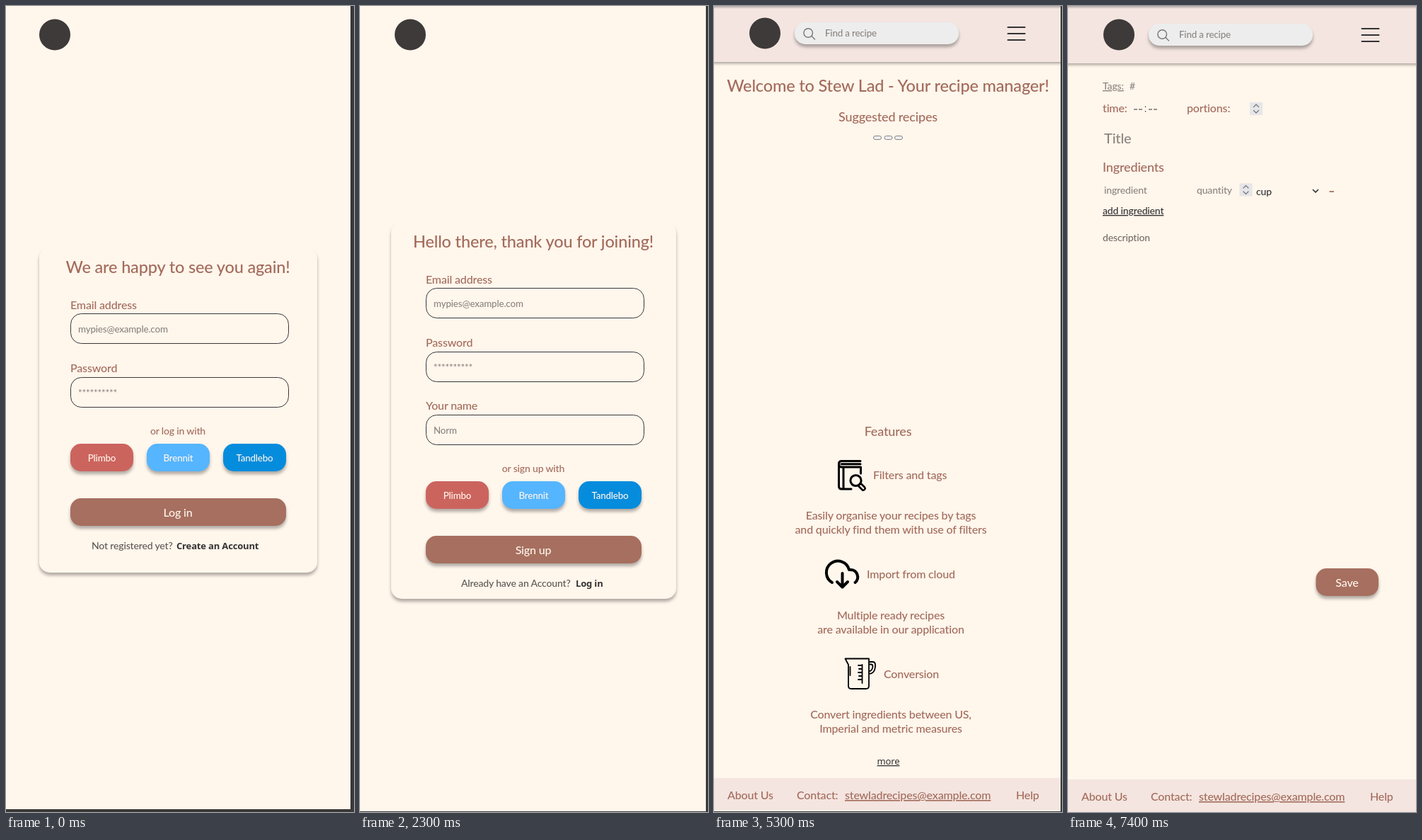
Animation of 492x1138 px, one loop 8 s. Source, as an HTML page:

```html
<!DOCTYPE html>
<html lang="en">
<head>
<meta charset="utf-8">
<title>Recipe manager</title>
<style>
  html, body { margin: 0; width: 100%; height: 100%; overflow: hidden; background: #3a3838; }
  #stage { display: block; width: 492px; height: 1138px; font: 500 16px Lato, sans-serif; letter-spacing: -.01em; fill: #a36b5b; }

  .screen { visibility: hidden; animation: 8s step-end infinite; }
  #login { animation-name: login; }
  #signup { animation-name: signup; }
  #home { animation-name: home; }
  #recipe { animation-name: recipe; }
  @keyframes login { 0% { visibility: visible } 6.25%, 100% { visibility: hidden } }
  @keyframes signup { 0% { visibility: hidden } 6.25% { visibility: visible } 43.75%, 100% { visibility: hidden } }
  @keyframes home { 0% { visibility: hidden } 43.75% { visibility: visible } 81.25%, 100% { visibility: hidden } }
  @keyframes recipe { 0% { visibility: hidden } 81.25%, 100% { visibility: visible } }

  .page, .card { fill: #fff6ec; }
  .card, .btn, .bar, .search { filter: drop-shadow(0 4px 2px rgba(0, 0, 0, .3)); }
  .btn { fill: #a66f5f; }
  .bar, .foot { fill: #f4e5e0; }
  .bar { filter: drop-shadow(0 2px 2px rgba(0, 0, 0, .36)); }
  .search { fill: #ededed; }
  .box { fill: none; stroke: #3a3838; }
  .logo { fill: #3d3a39; }
  .line { fill: none; stroke: #333; stroke-width: 1.7; stroke-linecap: round; stroke-linejoin: round; }
  .icon { fill: none; stroke: #000; stroke-linecap: round; stroke-linejoin: round; }
  .pill { fill: #efefef; stroke: #858585; }

  .mid { text-anchor: middle; }
  .h1 { font-size: 23.5px; }
  .h2 { font-size: 18px; }
  .small { font-size: 14px; }
  .hint { font-size: 13.33px; fill: #8b8580; }
  .gray { fill: #8b8580; }
  .dark { fill: #333; }
  .note { font-size: 14px; fill: #5c5855; }
  .bold { font: bold 13px "Noto Sans", sans-serif; fill: #333; }
  .white { fill: #fff6ec; }
  .under { text-decoration: underline; }
</style>
</head>
<body>
<svg id="stage" viewBox="0 0 492 1138">
  <defs>
    <linearGradient id="edge" x2="0" y2="1">
      <stop stop-color="#000" stop-opacity=".28"/>
      <stop offset="1" stop-color="#000" stop-opacity="0"/>
    </linearGradient>

    <rect id="field" class="box" x="91.5" y="434.5" width="308" height="42" rx="15"/>
    <rect id="shade" width="492" height="4" fill="url(#edge)"/>

    <g id="credentials">
      <text x="91" y="428">Email address</text>
      <use href="#field"/>
      <text class="hint" x="102" y="461">mypies@example.com</text>
      <text x="91" y="517">Password</text>
      <use href="#field" y="90"/>
      <text class="hint" x="102" y="551">**********</text>
    </g>

    <g id="buttons">
      <rect class="btn" x="91" y="618" width="89" height="39" rx="15" style="fill:#cc645e"/>
      <rect class="btn" x="199" y="618" width="89" height="39" rx="15" style="fill:#55b5ff"/>
      <rect class="btn" x="307" y="618" width="89" height="39" rx="15" style="fill:#058cdd"/>
      <g class="mid white" font-size="13.33">
        <text x="135.5" y="643">Plimbo</text>
        <text x="243.5" y="643">Brennit</text>
        <text x="351.5" y="643">Tandlebo</text>
      </g>
      <rect class="btn" x="91" y="695" width="305" height="39" rx="15"/>
    </g>

    <g id="header">
      <rect class="bar" x="-4" y="-6" width="500" height="85"/>
      <circle class="logo" cx="72" cy="38.5" r="22"/>
      <rect class="search" x="114" y="23" width="232" height="31" rx="15"/>
      <path class="line" style="stroke:#777;stroke-width:1.4" d="M139.5 38a6.3 6.3 0 1 1-12.6 0a6.3 6.3 0 1 1 12.6 0M138 42.5L142.5 47"/>
      <text class="hint" x="157" y="43">Find a recipe</text>
      <path class="line" style="stroke-width:2" d="M415.5 30h24m-24 9h24m-24 9h24"/>
    </g>

    <g id="footer">
      <rect class="foot" y="1090" width="492" height="46"/>
      <text x="19" y="1120">About Us</text>
      <text x="117" y="1120">Contact:</text>
      <text class="under" x="185" y="1120">stewladrecipes@example.com</text>
      <text x="427" y="1120">Help</text>
    </g>

    <g id="spinner">
      <rect width="18" height="18" fill="#e6e6e9"/>
      <path class="line" style="stroke:#777;stroke-width:1.2" d="M5.5 6.5L9 3l3.5 3.5M5.5 11.5L9 15l3.5-3.5"/>
    </g>
  </defs>

  <svg id="login" class="screen" width="487" height="1134">
    <rect class="page" width="492" height="1138"/>
    <circle class="logo" cx="69" cy="40.5" r="22"/>
    <rect class="card" x="47" y="341" width="393" height="459" rx="15"/>
    <text class="h1 mid" x="243" y="377">We are happy to see you again!</text>
    <use href="#credentials"/>
    <text class="small mid" x="243" y="605">or log in with</text>
    <use href="#buttons"/>
    <text class="mid white" x="243" y="720.5">Log in</text>
    <text class="note" x="121" y="766.5">Not registered yet?</text>
    <text class="bold" x="241" y="766.5">Create an Account</text>
  </svg>

  <svg id="signup" class="screen" width="489" height="1137">
    <rect class="page" width="492" height="1138"/>
    <circle class="logo" cx="71" cy="40.5" r="22"/>
    <rect class="card" x="44" y="305" width="403" height="532" rx="15"/>
    <text class="h1 mid" x="245" y="340.5">Hello there, thank you for joining!</text>
    <use href="#credentials" x="2" y="-36"/>
    <text x="93" y="570">Your name</text>
    <use href="#field" x="2" y="143"/>
    <text class="hint" x="104" y="604">Norm</text>
    <text class="small mid" x="245" y="658">or sign up with</text>
    <use href="#buttons" x="2" y="53"/>
    <text class="mid white" x="245" y="773.5">Sign up</text>
    <text class="note" x="143" y="819.5">Already have an Account?</text>
    <text class="bold" x="305" y="819.5">Log in</text>
  </svg>

  <svg id="home" class="screen" width="490" height="1137">
    <rect class="page" width="492" height="1138"/>
    <use href="#header"/>
    <use href="#shade"/>
    <text class="h1 mid" x="246" y="121">Welcome to Stew Lad - Your recipe manager!</text>
    <text class="h2 mid" x="246" y="163">Suggested recipes</text>
    <rect class="pill" x="225.5" y="183.5" width="11" height="5" rx="2.5"/>
    <rect class="pill" x="241" y="183.5" width="11" height="5" rx="2.5"/>
    <rect class="pill" x="255.5" y="183.5" width="11" height="5" rx="2.5"/>

    <text class="h2 mid" x="246" y="607">Features</text>
    <g class="icon" stroke-width="3">
      <path d="M207 642.5H180.500q-4 0-4 4V678q0 4 4 4H194M176.500 647q0 4 4 4H207.500V660M180 646.800H207M183 651.500V681.500"/>
      <circle cx="200.5" cy="670" r="7.6"/>
      <path d="M205 676l3-1.500 5 5q1.500 2-.5 3.500t-3 0l-5-5z" stroke-width="2.5"/>
    </g>
    <text x="225" y="667.5">Filters and tags</text>
    <g class="mid">
      <text x="250" y="725">Easily organise your recipes by tags</text>
      <text x="250" y="745">and quickly find them with use of filters</text>
      <text x="250" y="865.5">Multiple ready recipes</text>
      <text x="250" y="885.5">are available in our application</text>
      <text x="250" y="1006">Convert ingredients between US,</text>
      <text x="250" y="1026">Imperial and metric measures</text>
    </g>
    <path class="icon" stroke-width="4" d="M167 814A16.300 16.300 0 1 1 191 796H193A10.200 10.200 0 0 1 199.500 814M181.500 801V820M174 813L181.500 820.500L189 813"/>
    <text x="216" y="808">Import from cloud</text>
    <path class="icon" stroke-width="1.8" d="M185.500 921.500H219V960q0 4-4 4H194q-4 0-4-4V930zM219 926h5q4 0 4 4v3q-1 10-9 10M219 929.500h3q2.500 0 2.500 3q-.5 6-5.500 7M192.500 933V945M209.500 930V956M209 931h-5m5 5h-4m4 5h-5m5 5h-4m4 5h-5"/>
    <text x="240" y="948.5">Conversion</text>
    <text class="mid dark under" x="246.5" y="1071" style="font:13px 'Noto Sans',sans-serif">more</text>
    <use href="#footer"/>
    <rect class="page" y="1135" width="492" height="3"/>
  </svg>

  <svg id="recipe" class="screen" width="492" height="1138">
    <rect class="page" width="492" height="1138"/>
    <use href="#header" y="2"/>
    <use href="#shade"/>
    <text class="small gray under" x="49" y="118">Tags:</text>
    <text class="small gray" x="87" y="118">#</text>
    <text x="49" y="150">time:</text>
    <path class="line" style="stroke-width:1.2;stroke-linecap:butt" d="M93 146h5m2 0h5m9 0h5m2 0h5M109.500 141.500v1.500m0 5v1.500"/>
    <text x="168" y="150">portions:</text>
    <use href="#spinner" x="257" y="136"/>
    <text class="gray" x="51" y="194" font-size="20">Title</text>
    <text class="h2" x="49" y="234">Ingredients</text>
    <text class="small gray" x="51" y="265">ingredient</text>
    <text class="small gray" x="182" y="265">quantity</text>
    <use href="#spinner" x="242.5" y="250.5"/>
    <text class="small dark" x="266" y="267">cup</text>
    <path class="line" d="M346.500 259.500l3.500 3.500 3.500-3.500"/>
    <path class="line" style="stroke:#a36b5b;stroke-linecap:butt" d="M369.500 262h6.500"/>
    <text class="small dark under" x="49" y="294">add ingredient</text>
    <text class="small" x="49" y="332" fill="#756d67">description</text>
    <rect class="btn" x="350.5" y="794" width="88.5" height="39" rx="15"/>
    <text class="mid white" x="394.5" y="820">Save</text>
    <use href="#footer" y="2"/>
  </svg>
</svg>
</body>
</html>
```
